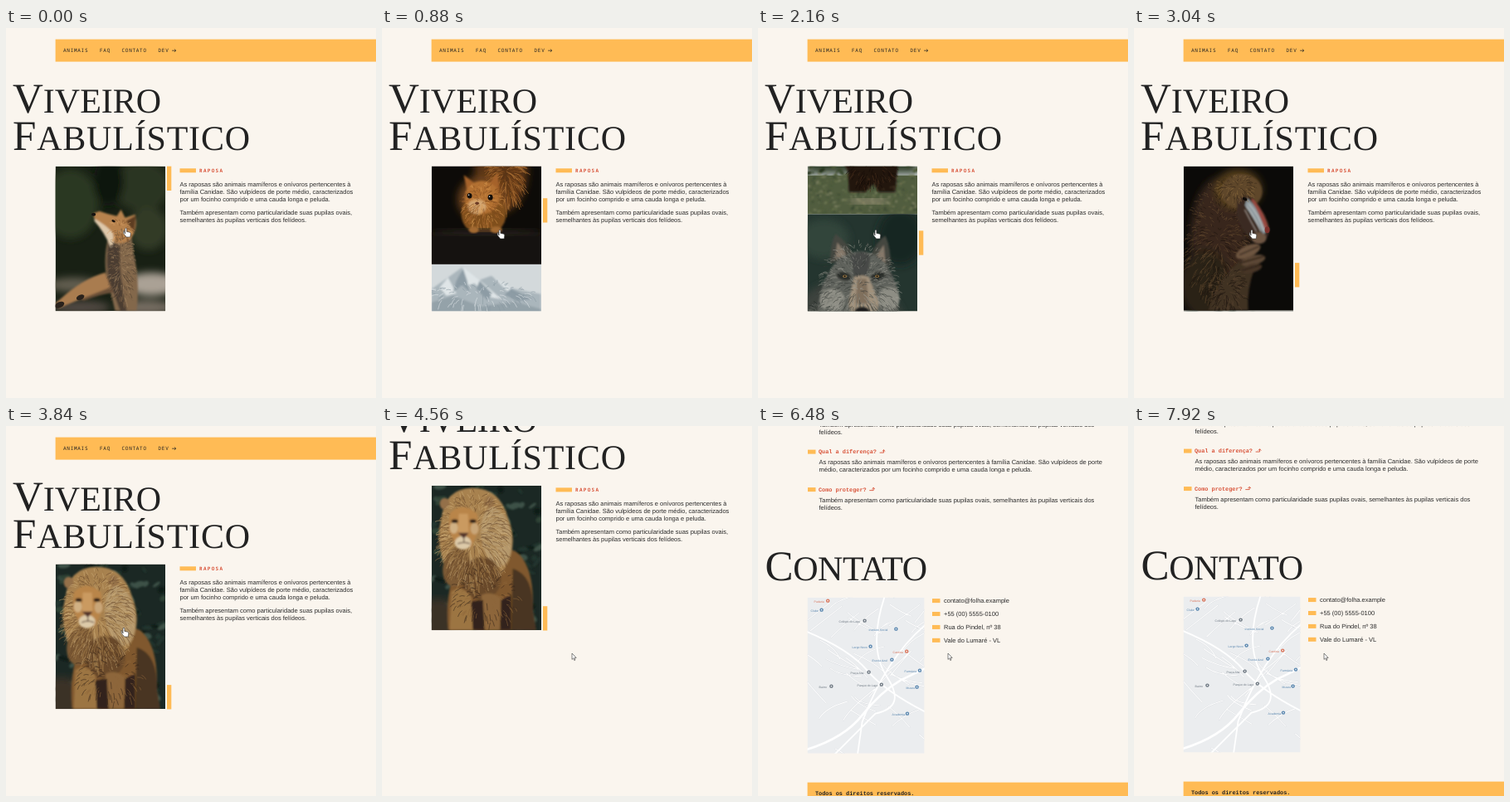
An HTML page that plays this animation: 446 by 446 pixels, repeating every 8000 ms.

```html
<!DOCTYPE html>
<html lang="pt-BR">
<head>
<meta charset="utf-8">
<title>Viveiro</title>
<style>
html, body { margin: 0; width: 100%; height: 100%; overflow: hidden; background: #faf5ee; }
svg { display: block; width: 100vw; height: 100vh; text-rendering: geometricPrecision; }
svg svg { width: auto; height: auto; }
.body { font: 7.5px "Liberation Sans", sans-serif; fill: #2c2c2c; }
.mono { font: bold 6.87px "Liberation Mono", monospace; fill: #222; }
.ask { fill: #d9553b; }
.nav { font: 500 6px "Noto Sans Mono", monospace; letter-spacing: .72px; fill: #222; }
.tag { font: bold 6px "Noto Sans Mono", monospace; letter-spacing: 1.3px; fill: #d9553b; }
.title { font: 42px "Liberation Serif", serif; fill: #222; }
.cap { font-size: 51px; }
.map { font: 3.5px "Liberation Sans", sans-serif; }
</style>
</head>
<body>
<svg id="stage" viewBox="0 0 446 446"></svg>
<script>
const LOOP = 8000, W = 132.5, H = 174.5, LEFT = 59.6, TOP = 166.7;
const YELLOW = '#ffbb55', PAPER = '#faf5ee';

let seed = 7;
const rnd = () => (seed = seed * 16807 % 2147483647) / 2147483647;
const between = (a, b) => a + rnd() * (b - a);
const n1 = v => v.toFixed(1);

const rect = (x, y, w, h, fill) => `<rect x="${x}" y="${y}" width="${w}" height="${h}" fill="${fill}"/>`;
const oval = (x, y, rx, ry, fill, turn = 0) =>
  `<ellipse cx="${x}" cy="${y}" rx="${rx}" ry="${ry}" fill="${fill}" transform="rotate(${turn} ${x} ${y})"/>`;
const shape = (d, fill) => `<path d="${d}" fill="${fill}"/>`;
const line = (d, color, w) => `<path d="${d}" fill="none" stroke="${color}" stroke-width="${w}" stroke-linecap="round"/>`;
const text = (x, y, cls, s) => `<text x="${x}" y="${y}" class="${cls}">${s}</text>`;
const lines = (x, y, step, rows) => rows.map((s, i) => text(x, y + i * step, 'body', s)).join('');
const soft = s => `<g filter="url(#soft)">${s}</g>`;
const haze = s => `<g filter="url(#haze)">${s}</g>`;
const title = (x, y, word, gap = 0) =>
  `<text x="${x}" y="${y}" class="title" letter-spacing="${gap}"><tspan class="cap">${word[0]}</tspan>${word.slice(1)}</text>`;

// Loose hairs that grow outwards and hang down
function fur(n, x, y, rx, ry, len, colors) {
  const hairs = colors.map(c => {
    let d = '';
    for (let i = 0; i < n; i++) {
      const a = between(0, 2 * Math.PI), r = Math.sqrt(rnd()), b = a + between(-.5, .5), l = len * between(.5, 1.2);
      d += `M${n1(x + Math.cos(a) * rx * r)} ${n1(y + Math.sin(a) * ry * r)}` +
        `q${n1(Math.cos(b) * l * .6)} ${n1(Math.sin(b) * l * .4)} ${n1(Math.cos(b) * l)} ${n1(Math.sin(b) * l + l * .45)}`;
    }
    return line(d, c, .8);
  }).join('');
  return `<g opacity=".7" filter="url(#hair)">${hairs}</g>`;
}

function specks(n, x, y, w, h, size, colors) {
  let s = '';
  for (let i = 0; i < n; i++)
    s += oval(n1(between(x, x + w)), n1(between(y, y + h)), n1(size * between(.4, 1)), n1(size * between(.2, .5)),
      colors[i % colors.length], Math.round(between(-60, 60)));
  return haze(s);
}

const fox = () => rect(0, 0, W, H, '#182014') +
  soft(oval(18, 45, 34, 42, '#2c3822') + oval(104, 24, 34, 30, '#2b3420') + oval(112, 75, 24, 26, '#333a26') +
    oval(64, 18, 18, 30, '#11170f') + oval(116, 142, 32, 14, '#aaa195') + oval(22, 143, 30, 9, '#625d50') +
    oval(108, 170, 34, 9, '#766d62') + oval(30, 170, 36, 8, '#514a42')) +
  haze(shape('M64 84Q58 108 61 130L72 174H98Q102 134 94 106L91 78Z', '#83684b') +
    shape('M64 90Q60 116 64 136L78 174H86Q76 130 78 96Z', '#4b3e33') +
    shape('M63 134Q46 138 30 152L26 158L34 162Q54 154 70 152Z', '#6b5038') +
    shape('M60 128Q32 136 6 160L0 165L4 171Q34 158 66 146Z', '#a97c50') +
    shape('M45 57L53 54Q64 58 74 60L79 52L84 62L96 58Q100 76 90 88Q76 98 64 86Q56 76 48 66Z', '#b7824d') +
    shape('M47 63Q60 70 69 80Q72 92 67 98Q58 78 47 66Z', '#dec8aa') +
    shape('M85 66L97 59L95 80Z', '#5d3c24')) +
  fur(110, 80, 122, 15, 46, 4, ['#a98c67', '#4f3f31', '#7d6247']) + fur(30, 78, 76, 14, 12, 4, ['#d6a068', '#85572f']) +
  oval(46, 58, 2.6, 2, '#141210') + oval(70, 66, 2.3, 1.3, '#1b130d', 25) +
  oval(5, 167, 6, 3.5, '#2a221c', -25) + oval(30, 158, 5, 3, '#2a221c', -25);

const squirrel = () => rect(0, 0, W, H, '#0d0b08') +
  soft(oval(84, 62, 32, 50, '#5a3514') + oval(62, 96, 30, 28, '#6d421c')) +
  fur(110, 90, 62, 17, 38, 12, ['#a0622a', '#cd8840', '#754218']) +
  haze(oval(63, 114, 27, 26, '#80501f') + shape('M43 86L39 67L55 79Z', '#a5622a') + shape('M67 80L80 64L82 88Z', '#a5622a') +
    oval(61, 94, 21, 20, '#b37133') + oval(55, 105, 11, 9, '#d3a570')) +
  fur(90, 61, 102, 23, 25, 5, ['#d99a52', '#7b481d', '#a9692f']) +
  oval(46, 92, 2.8, 3.2, '#120d09') + oval(71, 94, 3, 3.4, '#120d09') + oval(55, 101, 2.4, 1.7, '#6b3a24') +
  oval(45, 91, .7, .7, '#fff') + oval(70, 93, .7, .7, '#fff') +
  rect(0, 136, W, 39, '#151210') + soft(oval(66, 136, 66, 4, '#27211c')) +
  haze(oval(51, 133, 6, 4, '#a36a32') + oval(78, 133, 7, 4, '#a36a32'));

const bear = () => rect(0, 0, W, H, '#d3d9db') +
  haze(shape('M0 30L20 16L38 3L58 19L72 14L96 29L132 36V80H0Z', '#aab6bc') +
    shape('M38 3L32 18L42 26L52 23L66 39L84 42L58 19ZM20 16L10 28L18 38L30 35ZM74 15L92 33L112 37L96 29Z', '#dfe5e7') +
    shape('M38 5L30 20L26 34L37 25L45 33L43 20ZM58 20L54 30L68 44L73 35ZM96 29L88 37L104 44L122 42Z', '#8d9ca5') +
    shape('M0 46L26 38L60 51L100 45L132 54V80H0Z', '#94a2a9')) +
  fur(45, 60, 36, 62, 15, 7, ['#e3e8ea', '#8b9aa2']) +
  soft(rect(0, 66, W, 60, '#35422e')) + specks(60, 0, 66, W, 64, 5, ['#28341f', '#4d5a38', '#3b482d']) +
  rect(0, 128, W, 47, '#515d3f') + specks(200, 0, 122, W, 53, 2.6, ['#6e774f', '#3a4830', '#4a5839', '#7d8060']) +
  haze(oval(76, 102, 34, 34, '#2f1c13') + oval(44, 96, 17, 16, '#402819') + shape('M48 106H110L106 148H86L80 138L70 148H50Z', '#24160f')) +
  fur(90, 78, 116, 28, 28, 5, ['#4b301f', '#160d09']) +
  soft(oval(74, 159, 24, 3, '#a49880')) + specks(50, 0, 130, W, 42, 1, ['#d8d2b0', '#c7ad78']);

const wolf = () => rect(0, 0, W, H, '#24352f') +
  soft(oval(20, 30, 30, 24, '#33443b') + oval(112, 28, 28, 34, '#192723') + oval(48, 138, 70, 58, '#3c423e')) +
  haze(shape('M27 60Q28 34 34 24Q48 34 56 50ZM76 50Q84 32 94 26Q101 42 100 64Z', '#454641') +
    shape('M33 54L36 34L48 50ZM82 53L92 37L94 60Z', '#86796b') +
    shape('M23 76Q36 46 64 45Q92 46 104 78Q114 98 108 118Q98 142 84 174H44Q24 132 12 118Q14 92 23 76Z', '#5f625c') +
    shape('M52 50Q64 42 76 50L72 78H56Z', '#474a46') +
    oval(30, 104, 15, 14, '#8d8d84') + oval(98, 102, 13, 14, '#8d8d84') +
    shape('M56 76Q66 72 74 76L86 106Q84 126 68 130Q50 126 50 106Z', '#a0917c') + shape('M60 78H71L74 108H58Z', '#806f5d') +
    oval(44, 75, 9, 5, '#2c2d2a', 15) + oval(85, 75, 9, 5, '#2c2d2a', -15)) +
  fur(230, 62, 92, 46, 58, 6, ['#9c9b92', '#373a37', '#73756e']) +
  fur(90, 16, 140, 22, 34, 7, ['#6f726b', '#1d2421']) +
  oval(45, 75, 2.4, 1.7, '#8f6e3c') + oval(84, 75, 2.4, 1.7, '#8f6e3c') + oval(45, 75, 1, 1, '#111') + oval(84, 75, 1, 1, '#111') +
  haze(oval(66, 118, 9, 6, '#1b1b1a'));

const baboon = () => rect(0, 0, W, H, '#0b0a08') +
  soft(oval(44, 90, 36, 76, '#37281a') + oval(66, 28, 28, 24, '#57401f') + oval(26, 142, 30, 42, '#2c2018')) +
  fur(170, 42, 92, 38, 72, 6, ['#553f28', '#1d150e', '#6a5033']) +
  haze(oval(70, 31, 25, 21, '#5f4629') + shape('M65 40Q75 33 84 39Q101 59 104 76Q102 92 88 93Q72 84 64 60Z', '#3a2a20') +
    shape('M77 39Q90 50 101 75L97 83Q84 63 74 47Z', '#8e989d') +
    shape('M82 39L86 42Q98 58 102 74L98 76Q91 56 82 42Z', '#9a4a40') + oval(91, 87, 9, 7, '#6d5542')) +
  haze(line('M76 49Q85 59 93 79M79 46Q91 59 97 78M74 53Q80 65 88 79', '#d5d6d2', 1)) +
  fur(70, 64, 26, 24, 15, 4, ['#8a6a3e', '#38291a']) +
  oval(74, 40, 3, 1.8, '#0d0a08', 25) + oval(101, 77, 3, 4, '#7d302b') +
  haze(shape('M30 174Q46 130 70 113L86 122Q76 150 78 174Z', '#403023') + oval(78, 103, 16, 7, '#6d553f', -25) +
    oval(84, 114, 15, 6, '#5c4736', -15) + oval(82, 124, 13, 5, '#463628', -15) +
    line('M68 107L91 97M69 117L97 109M71 126L94 119', '#21170f', 1.2)) +
  fur(80, 52, 150, 22, 28, 6, ['#5a4531', '#1b140e']);

const lion = () => rect(0, 0, W, H, '#1b2824') +
  specks(130, 0, 0, W, H, 8, ['#2d4236', '#111a17', '#3c5147', '#22352d']) +
  soft(oval(8, 160, 26, 24, '#3a3128')) +
  haze(shape('M60 84Q96 66 110 88Q124 108 122 150L126 174H20Q16 130 30 100Z', '#80592f') +
    shape('M98 100Q124 108 122 152L126 174H96Z', '#4a3423') +
    shape('M12 40Q16 4 48 3Q82 2 92 38Q106 72 88 100Q76 124 52 126Q20 116 12 84Q6 60 12 40Z', '#a8824f') +
    oval(78, 62, 18, 36, '#b5986c', -8) + oval(30, 98, 16, 24, '#7c5a35', 12) + oval(60, 112, 24, 26, '#69492a') +
    oval(16, 22, 6, 7, '#94704a') + oval(70, 20, 6, 7, '#94704a')) +
  fur(230, 50, 64, 38, 56, 10, ['#cbab78', '#67472a', '#a37d49']) +
  haze(shape('M22 34Q37 18 55 34L57 54L48 74H30L21 54Z', '#b9854a') + oval(38, 69, 10, 8, '#ddcaa9') +
    shape('M33 34H44L45 58H32Z', '#ca9a60') + oval(27, 51, 5, 7, '#d1b184') + oval(52, 52, 5, 7, '#c9a678') +
    shape('M32 57H45L39 64Z', '#55342b') + line('M39 64V68M32 70Q39 67 46 70', '#4b3026', 1.2) +
    oval(28, 43, 4, 2.2, '#2b1c12') + oval(50, 43, 4, 2.2, '#2b1c12') +
    shape('M24 128Q36 118 48 134L50 174H22Z', '#9c7443') + shape('M60 132Q72 126 84 136L82 174H64Z', '#8d663a') +
    shape('M48 140L62 138L64 174H50ZM84 138L96 132V174H83Z', '#30241a')) +
  fur(80, 66, 134, 40, 34, 6, ['#8e683c', '#38281b']);

const photos = [fox, squirrel, bear, wolf, baboon, lion]
  .map((f, i) => `<svg y="${i * H}" width="${W}" height="${H}">${f()}</svg>`).join('');

const places = [
  [8, 6, 'Padaria', '#d8745a'], [38, 30, 'Colégio do Lago', '#6d7781'], [4, 17, 'Clube', '#5684ad'],
  [74, 40, 'Instituto Social', '#5684ad'], [54, 61, 'Largo Novo', '#5684ad'], [103, 67, 'Cantina', '#d8745a'],
  [78, 77, 'Escola Azul', '#5684ad'], [52, 92, 'Praça Alta', '#6d7781'], [60, 107, 'Parque do Lago', '#6d7781'],
  [117, 90, 'Farmácia', '#5684ad'], [102, 142, 'Academia', '#5684ad'], [14, 109, 'Bairro', '#6d7781'], [119, 110, 'Museu', '#5684ad']
];

function cityMap() {
  let s = rect(0, 0, 141, 188, '#ebedef'), streets = '';
  for (let i = 0; i < 46; i++) {
    const x = between(-10, 140), y = between(-10, 185), k = i % 2 ? 1 : -1.5;
    streets += `M${n1(x)} ${n1(y)}q${n1(between(5, 22))} ${n1(k * 9)} ${n1(between(22, 42))} ${n1(k * between(10, 26))}`;
  }
  s += line(streets, '#d8dbdf', 1.7) + line(streets, '#fdfdfd', 1.1);
  s += line('M-4 40Q50 62 72 88T146 140M94 -4Q72 60 96 96T82 140L30 192M146 30Q96 70 66 150L60 192', '#fff', 1.8);
  s += line('M-3 184Q44 170 66 142T112 100L145 84', '#fff', 2.6);
  return s + places.map(([x, y, name, c]) => {
    const pin = x + name.length * 1.8 + 4;
    return `<text x="${x}" y="${y}" class="map" fill="${c}">${name}</text>` + oval(pin, y - 2, 2.2, 2.2, c) + oval(pin, y - 2, .8, .8, '#fff');
  }).join('');
}

const about = 'As raposas são animais mamíferos e onívoros pertencentes à';
const answers = [
  [about + ' família Canidae. São vulpídeos de porte', 'médio, caracterizados por um focinho comprido e uma cauda longa e peluda.'],
  ['Também apresentam como particularidade suas pupilas ovais, semelhantes às pupilas verticais dos', 'felídeos.']
];
const faq = ['Qual a origem?', 'Quais os hábitos?', 'Qual a diferença?', 'Como proteger?'].map((q, i) => {
  const y = 452.5 + i * 45.5, x = 77 + q.length * 4.12;
  return rect(60, y - 2.5, 9.5, 5, YELLOW) + text(73, y + 2, 'mono ask', q) +
    line(`M${x} ${y + 1}H${x + 4.5}V${y - 2}M${x + 3} ${y - .8}L${x + 4.5} ${y - 2.3}L${x + 6} ${y - .8}`, '#d9553b', .9) +
    lines(73.5, y + 15, 9, answers[i % 2]);
}).join('');

const contacts = ['contato@folha.example', '+55 (00) 5555-0100', 'Rua do Pindel, nº 38', 'Vale do Lumaré - VL']
  .map((s, i) => rect(210, 720.5 + i * 15.9, 9.5, 5, YELLOW) + text(224, 725.7 + i * 15.9, 'body', s)).join('');

const menu = [[69, 'ANIMAIS'], [113, 'FAQ'], [139.5, 'CONTATO'], [183.5, 'DEV']].map(([x, s]) => text(x, 29.2, 'nav', s)).join('') +
  line('M200.5 27.2H204.6M203.2 25.8L204.8 27.2L203.2 28.6', '#222', .7);

const stage = document.getElementById('stage');
stage.innerHTML = `<defs>
  <filter id="soft"><feGaussianBlur stdDeviation="5"/></filter>
  <filter id="haze"><feGaussianBlur stdDeviation=".8"/></filter>
  <filter id="hair"><feGaussianBlur stdDeviation=".3"/></filter></defs>` +
  rect(0, 0, 446, 446, PAPER) + '<g id="page">' +
  rect(LEFT, 13.6, 387, 27, YELLOW) + menu +
  title(8, 102, 'VIVEIRO') + title(8, 147, 'FABULÍSTICO', .8) +
  `<svg x="${LEFT}" y="${TOP}" width="${W}" height="${H}"><g id="list">${photos}</g></svg>` +
  `<rect id="thumb" x="194" width="5.3" height="29.3" fill="${YELLOW}"/>` +
  rect(209.5, 169.3, 19.5, 5, YELLOW) + text(233, 174.2, 'tag', 'RAPOSA') +
  lines(209.5, 190.5, 9, [about, 'família Canidae. São vulpídeos de porte médio, caracterizados', 'por um focinho comprido e uma cauda longa e peluda.']) +
  lines(209.5, 225.2, 9, ['Também apresentam como particularidade suas pupilas ovais,', 'semelhantes às pupilas verticais dos felídeos.']) +
  `<g id="faq">${title(8, 427, 'FAQ')}${faq}</g>` +
  `<g id="contact">${title(8.5, 698, 'CONTATO', -.4)}<svg x="${LEFT}" y="719" width="141" height="188">${cityMap()}</svg>${contacts}</g>` +
  rect(LEFT, 942, 387, 27, YELLOW) + text(69, 957, 'mono', 'Todos os direitos reservados.') + '</g>' +
  `<g id="cursor" stroke="#333" stroke-width=".6" stroke-linejoin="round" fill="#fff">
    <path id="hand" d="M0 .8Q1-.4 1.9.8V4.4L5.6 5.2Q7 5.6 6.8 7L6.2 11H1.6L-1.8 6.8Q-2-.2 0 7Z"/>
    <path id="arrow" d="M0 0V7.4L1.7 5.9L2.8 8.5L4 8L2.9 5.4H5.2Z"/></g>`;

const el = {};
for (const id of ['page', 'list', 'thumb', 'faq', 'contact', 'cursor', 'hand', 'arrow']) el[id] = document.getElementById(id);

const ease = (t, a, b) => {
  const u = Math.min(1, Math.max(0, (t - a) / (b - a)));
  return u * u * (3 - 2 * u);
};
// Each move is [start, end, distance]
const travel = (t, moves) => moves.reduce((sum, [a, b, d]) => sum + d * ease(t, a, b), 0);

const photoMoves = [[40, 880, 231], [1220, 2100, 235], [2300, 3030, 232.5], [3130, 3780, 174]];
const pageMoves = [[4345, 4765, 182], [5000, 5560, 166], [5971, 6571, 175], [7770, 8070, -19]];

const move = (node, x, y) => node.setAttribute('transform', `translate(${x.toFixed(2)} ${y.toFixed(2)})`);

function reveal(node, t, start) {
  const k = ease(t, start, start + 300);
  move(node, -13 * (1 - k), 0);
  node.setAttribute('opacity', k);
}

function draw(t) {
  const s = travel(t, photoMoves);
  move(el.list, 0, -s);
  el.thumb.setAttribute('y', TOP + s / 6);
  move(el.page, 0, -travel(t, pageMoves));
  reveal(el.faq, t, 4580);
  reveal(el.contact, t, 6130);

  const x = 143.5 + travel(t, [[100, 700, -2.5], [3860, 4300, 88]]);
  const y = 241 + travel(t, [[100, 700, 2], [3860, 4300, 31]]);
  move(el.cursor, x, y);
  const over = x < 192;
  el.hand.style.display = over ? '' : 'none';
  el.arrow.style.display = over ? 'none' : '';
}

const begin = performance.now();
function tick() {
  draw((performance.now() - begin) % LOOP);
  requestAnimationFrame(tick);
}
tick();
</script>
</body>
</html>
```
